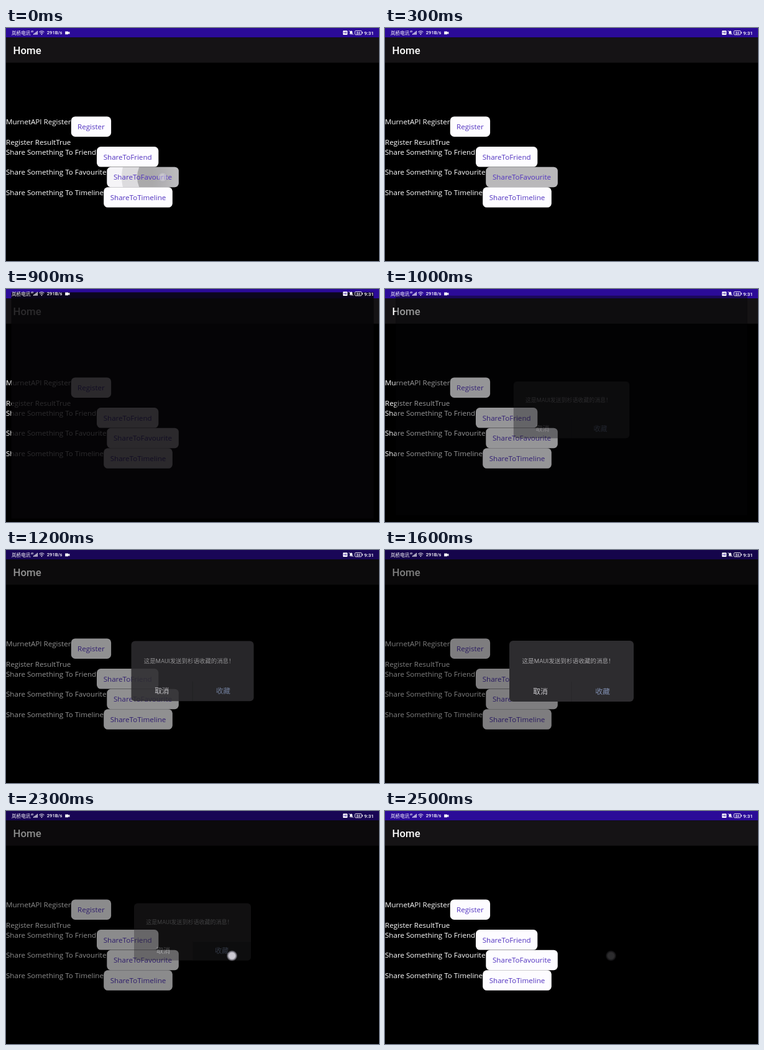
An HTML page for the animation above (2.6 s loop, 600x375 px).

```html
<!DOCTYPE html>
<html lang="en">
<head>
<meta charset="utf-8">
<title>Share demo</title>
<style>
  html, body { margin: 0; width: 100%; height: 100%; overflow: hidden; background: #000; }
  svg { display: block; width: 100%; height: 100%; }
  text { font-family: Roboto, "Noto Sans CJK SC", "Noto Sans CJK", sans-serif; fill: #fff; }
  .body text { font: 11.6px "Open Sans", sans-serif; }
  .body .caption { fill: #5132c0; text-anchor: middle; }
  .mid { text-anchor: middle; }
  .status { fill: #fff; }
  .status text { font-size: 7.6px; font-weight: 500; }
</style>
</head>
<body>
<svg viewBox="0 0 600 375">
  <defs>
    <radialGradient id="glow">
      <stop offset=".55" stop-color="#e6e4ee" stop-opacity=".88"/>
      <stop offset=".78" stop-color="#b8b6c4" stop-opacity=".6"/>
      <stop offset="1" stop-color="#8a8896" stop-opacity="0"/>
    </radialGradient>
    <linearGradient id="rippleTint">
      <stop offset=".3" stop-opacity=".23"/>
      <stop offset=".75" stop-opacity=".15"/>
    </linearGradient>
    <clipPath id="pressed"><rect x="162.3" y="223.7" width="115.5" height="32.5" rx="6.5"/></clipPath>
  </defs>

  <rect width="600" height="375"/>
  <rect width="600" height="15.3" fill="#2b0b98"/>
  <rect y="15.3" width="600" height="40.5" fill="#151315"/>
  <text x="11.6" y="42" font-size="16.8" font-weight="500">Home</text>
  <g class="body" id="body"></g>

  <rect id="dim" width="600" height="375"/>

  <g id="dialog">
    <rect x="200" y="146" width="200" height="98" rx="6" fill="#2d2c2f"/>
    <path d="M300 212V244" stroke="#28272a"/>
    <path id="confirm" d="M301 212H400V238a6 6 0 0 1-6 6H301Z" fill="#1f1e21"/>
    <text x="220.5" y="181.7" font-size="9.6" style="fill:#a5a4a7">这是MAUI发送到杉语收藏的消息！</text>
    <g class="mid" font-size="11.8" font-weight="500">
      <text x="250" y="231.7" style="fill:#cdccd0">取消</text>
      <text x="350" y="231.7" style="fill:#7e8dae">收藏</text>
    </g>
  </g>

  <g id="wait">
    <rect width="600" height="375" fill="#060508"/>
    <g id="loader">
      <rect x="257.3" y="152.8" width="84.9" height="84.9" rx="7" fill="#605e61"/>
      <g id="spinner" fill="none" stroke="#fff" stroke-width="2.6"></g>
      <text class="mid" x="300" y="219" font-size="11.8">请稍候...</text>
    </g>
  </g>

  <g class="status">
    <text x="9" y="10.5">岚桥电讯</text>
    <text x="40" y="6.8" style="font-size:3.6px">4G</text>
    <path d="M44 10.7V9h1.2v1.7zM45.9 10.7V7.7h1.2v3zM47.8 10.7V6.2H49v4.5zM49.7 10.7V4.7h1.2v6z"/>
    <g fill="none" stroke="#fff" stroke-width="1">
      <path d="M53.4 6.5a6 6 0 0 1 8 0M54.9 8.3a3.7 3.7 0 0 1 5 0"/>
      <circle cx="57.4" cy="10" r=".6"/>
    </g>
    <text x="65.8" y="10.3">291B/s</text>
    <path d="M95.2 5.4h5v1.5l2.2-1.2v4.2l-2.2-1.2v1.5h-5z"/>
    <rect x="542" y="4.2" width="7.3" height="6.8" rx="1"/>
    <text class="mid" x="545.6" y="9.2" style="font-size:4.2px;fill:#2b0b98">HD</text>
    <path d="M552.2 9.6l1-1V6.4a2 2 0 0 1 4 0v2.2l1 1zM554 10.2h2.3l-1.1.9z"/>
    <path d="M551.6 4l7 7" stroke="#fff" stroke-width=".9"/>
    <rect x="561.3" y="4.4" width="10.8" height="6.4" rx="1.3" fill="none" stroke="#fff" stroke-width=".9"/>
    <rect x="572.8" y="6.3" width="1.1" height="2.6"/>
    <text class="mid" x="566.7" y="9.6" style="font-size:5.4px">84</text>
    <text x="576" y="10.5" style="font-size:8px">9:31</text>
  </g>

  <circle id="touch" r="9" fill="url(#glow)"/>
</svg>
<script>
const LOOP = 2600, STEP = 100;
const $ = id => document.getElementById(id);
const set = (id, attrs) => {
  for (const name in attrs) $(id).setAttribute(name, attrs[name]);
};

// Linear interpolation through [time, value] pairs.
function key(t, ...points) {
  if (t <= points[0][0]) return points[0][1];
  for (let i = 1; i < points.length; i++) {
    const [t0, v0] = points[i - 1], [t1, v1] = points[i];
    if (t <= t1) return v0 + (v1 - v0) * (t - t0) / (t1 - t0);
  }
  return points[points.length - 1][1];
}

const scaled = s => `translate(300 187.5) scale(${s}) translate(-300 -187.5)`;

// label, top, then button caption, left and width
const rows = [
  ['MurnetAPI Register', 142.4, 'Register', 104.8, 64.3],
  ['Register ResultTrue', 175],
  ['Share Something To Friend', 191.1, 'ShareToFriend', 146, 99.3],
  ['Share Something To Favourite', 223.7, 'ShareToFavourite', 162.3, 115.5],
  ['Share Something To Timeline', 256.3, 'ShareToTimeline', 157.2, 110.6],
];
const ripple = `<g id="ripple" clip-path="url(#pressed)">
  <circle id="halo" cx="252" cy="240" opacity=".1"/>
  <circle id="core" cx="252" cy="240" fill="url(#rippleTint)"/>
  <rect id="press" x="160" y="220" width="120" height="40"/></g>`;

$('body').innerHTML = rows.map(([label, y, caption, x, w]) =>
  `<text x="0" y="${y + 12.6}">${label}</text>` + (caption ?
    `<rect x="${x}" y="${y}" width="${w}" height="32.5" rx="6.5" fill="#fdfcff"/>
     ${caption === 'ShareToFavourite' ? ripple : ''}
     <text class="caption" x="${x + w / 2}" y="${y + 20.6}">${caption}</text>` : '')
).join('');

// Spinner tail: short arcs that brighten towards the head.
const ARCS = 60, HEAD = 0.25;
const ringPoint = a => `${299.6 + 14 * Math.cos(a)} ${183 + 14 * Math.sin(a)}`;
$('spinner').innerHTML = Array.from({ length: ARCS }, (_, i) => {
  const a = HEAD - (i + 1) / ARCS * 2 * Math.PI;
  return `<path d="M${ringPoint(a)}A14 14 0 0 1 ${ringPoint(a + 0.11)}"
    opacity="${0.85 * (1 - i / ARCS) ** 1.4}"/>`;
}).join('');

function draw(t) {
  const spreading = t < 200;
  set('halo', { r: key(t, [0, 66], [200, 100]), visibility: spreading ? 'visible' : 'hidden' });
  set('core', { r: key(t, [0, 41], [200, 92]), visibility: spreading ? 'visible' : 'hidden' });
  set('press', { opacity: spreading ? 0.03 : 0.27 });
  set('ripple', { opacity: key(t, [300, 1], [600, 0]) * (t < 700) });

  set('wait', {
    opacity: key(t, [300, 0], [400, .4], [500, .88], [600, 1], [800, 1], [900, .85], [1000, .42], [1100, .1], [1200, 0]),
    transform: scaled(key(t, [300, .92], [600, 1], [800, 1], [1000, .943], [1200, .92])),
  });
  set('loader', { visibility: t < 700 ? 'visible' : 'hidden' });

  set('dim', { opacity: key(t, [1000, 0], [1100, .25], [1200, .43], [1300, .5], [2200, .5], [2300, .45], [2400, .2], [2500, 0]) });
  set('dialog', {
    opacity: key(t, [900, 0], [1000, .4], [1100, .75], [1300, 1], [2200, 1], [2300, .38], [2400, 0]),
    transform: scaled(key(t, [900, .9], [1000, .932], [1100, .97], [1300, 1], [2200, 1], [2300, .94], [2400, .92])),
  });
  set('confirm', { opacity: key(t, [1900, 0], [2100, .6]) });

  const first = t < 1000;
  set('touch', {
    cx: first ? 252 : 363.5,
    cy: first ? 240 : 233,
    opacity: first ? key(t, [0, .5], [200, 0])
                   : key(t, [1900, 0], [2000, .8], [2100, 1], [2300, 1], [2400, .6], [2500, .22]),
  });
}

const start = performance.now();
function tick() {
  const elapsed = (performance.now() - start) % LOOP;
  draw(Math.floor(elapsed / STEP) * STEP);
  requestAnimationFrame(tick);
}
tick();
</script>
</body>
</html>
```
